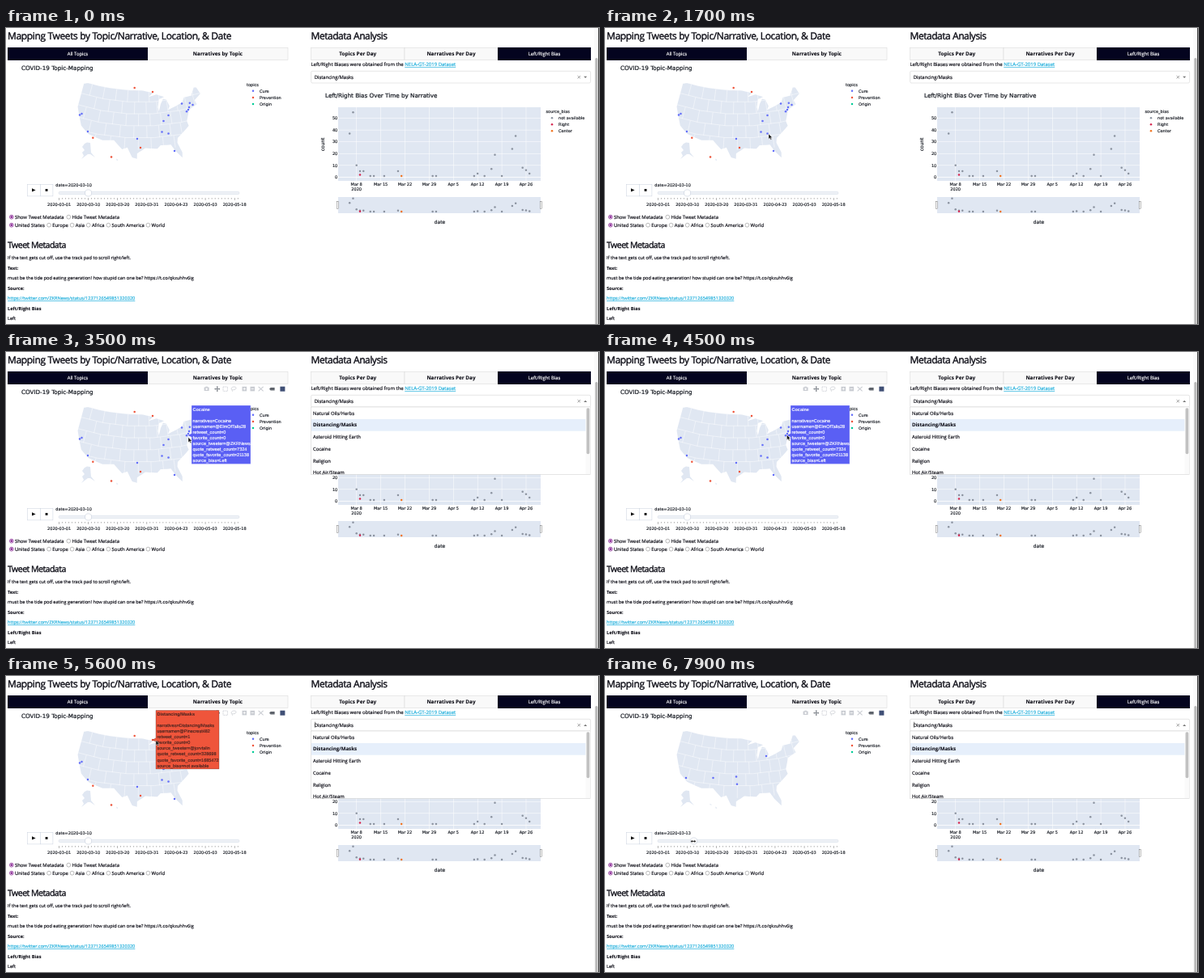
An HTML page that plays this animation: 732x366 px, repeating every 8 s.

```html
<!DOCTYPE html>
<html lang="en">
<head>
<meta charset="utf-8">
<title>Topic dashboard</title>
<style>
html, body { margin: 0; width: 100%; height: 100%; overflow: hidden; background: #fff; }
svg { display: block; width: 100vw; height: 100vh; }
text { font-family: "Open Sans", "Noto Sans", sans-serif; color: #0b0b14; fill: currentColor; stroke: currentColor;
  stroke-width: .03em; text-rendering: geometricPrecision; white-space: pre; }
.plot { font-family: "DejaVu Sans", Verdana, sans-serif; color: #161a22; }
.tip { font-family: "Liberation Sans", Arial, sans-serif; }
.b { font-weight: 700; stroke-width: .01em; }
.w { color: #fff; }
.link { color: #1eaedb; fill: currentColor; stroke: currentColor; text-decoration: underline; }
</style>
</head>
<body>
<svg id="stage" viewBox="0 0 732 366"></svg>
<script>
const BLUE = '#636efa', RED = '#ef553b', GREEN = '#00cc96', GREY = '#8b93a0';
const CRIMSON = '#d62750', ORANGE = '#f0731f', PANEL = '#e0e7f2', NAVY = '#04041f';

const text = (x, y, s, size = 5.9, cls = '', more = '') =>
  `<text x="${x}" y="${y}" font-size="${size}" class="${cls}" ${more}>${s}</text>`;
const mid = 'text-anchor="middle"', end = 'text-anchor="end"';
const plot = (x, y, s, more = '', size = 5) => text(x, y, s, size, 'plot', more);
const rect = (x, y, w, h, fill, more = '') =>
  `<rect x="${x}" y="${y}" width="${w}" height="${h}" fill="${fill}" ${more}/>`;
const dot = (x, y, fill, r = 1.25, more = '') => `<circle cx="${x}" cy="${y}" r="${r}" fill="${fill}" ${more}/>`;
const path = (d, more) => `<path d="${d}" ${more}/>`;
const box = (c, w = 0.5) => `stroke="${c}" stroke-width="${w}"`;
const stroke = (c, w) => 'fill="none" ' + box(c, w);
const group = (id, body) => `<g id="${id}">${body}</g>`;

// --- Map: Albers equal-area projection ---
function project(lon, lat) {
  const rad = Math.PI / 180, n = 0.6028, a = n * (lon + 96) * rad;
  const r = Math.sqrt(1.3512 - 2 * n * Math.sin(lat * rad)) / n;
  return [164 + 210 * (r * Math.sin(a) + 0.0081), 115 + 210 * (r * Math.cos(a) - 1.2822)];
}
function trace(points) {
  const out = [];
  points.forEach(([lon, lat], i) => {
    const [toLon, toLat] = points[i + 1] || [lon, lat];
    for (let k = 0; k < 1; k += 0.2)
      out.push(project(lon + (toLon - lon) * k, lat + (toLat - lat) * k).map(v => v.toFixed(2)).join(' '));
  });
  return 'M' + out.join('L');
}
const coast = trace(`-124.7 48.4,-122.8 49,-95.2 49,-89.6 48,-92 46.7,-88 47.4,-84.4 46.3,-87 45.7,-87.8 43,-87.5 41.7,
-86.4 44,-85 45.7,-83.4 45.2,-82.4 43,-83.3 41.8,-79 42.8,-76.3 43.5,-75 45,-71.5 45,-69.2 47.4,-68 47.2,-67 44.8,
-70.5 43.2,-70 41.7,-74 40.6,-76 37,-75.6 35.4,-81 32,-81.4 30.5,-80.1 27,-80.4 25.2,-82.7 28,-84 30.1,-88 30.3,
-89.4 29.2,-94 29.6,-97.2 27.8,-97.2 26,-99 26.4,-101 29.7,-103 29,-106.5 31.8,-111 31.3,-117.1 32.5,-120.6 34.6,
-124.3 40.4`.split(',').map(p => p.trim().split(' ').map(Number))) + 'Z';

// State lines: parallels every 4 degrees, staggered meridians that crowd together eastward.
let borders = '';
for (let row = 0; row < 5; row++) {
  const top = 49 - row * 4;
  borders += trace([[-125, top], [-67, top]]);
  for (let lon = row % 2 ? -117 : -120.5, step = 6.5; lon < -68; lon += step, step *= 0.94)
    borders += trace([[lon, top], [lon, top - 4]]);
}
const alaska = 'M94 147L97 143L100 141.5L104 142L105 154L110 160L104 156L101 156L93 162L96 158L94 154L97 151Z';
const islands = 'M129 158l2 .5l1 1l-2 0ZM136 161.5l2.5 1.4l-1.6 1.4Z';

const dots = (list, fill) => list.map(([x, y]) => dot(x, y, fill)).join('');
const early = dots([[91, 107.5], [93.5, 106], [101, 128], [162, 137], [192.5, 128.5], [200.5, 130.5], [194.5, 115],
  [200.5, 108], [208, 152], [217, 93.5], [226.8, 92.7], [230.5, 95], [226, 98], [225, 101], [223, 103.3]], BLUE) +
  dots([[158.7, 74], [181, 79], [107.3, 135.8], [166, 148], [130, 159.5]], RED);
const late = dots([[100, 126], [133.5, 126], [162, 124.5], [163, 133.8], [199, 99]], BLUE);

// --- Left column ---
const tab = (x, w, label, on) => (on ? rect(x, 24, w, 16, NAVY) : rect(x, 24.5, w, 15, '#f9f9f9', box('#d6d6d6'))) +
  text(x + w / 2, 34, label, on ? 5.9 : 6.4, on ? 'w' : 'b', mid);
const radio = (x, y, label, on) => dot(x, y, '#fff', 2.4, box(on ? '#8a2a96' : '#777', on ? 0.8 : 0.5)) +
  (on ? dot(x, y, '#8a2a96', 1.4) : '') + text(x + 4.2, y + 2.3, label);
const key = (x, y, label, fill) => dot(x, y, fill) + plot(x + 8, y + 1.8, label);

let left = text(2, 14, 'Mapping Tweets by Topic/Narrative, Location, &amp; Date', 12, '', 'letter-spacing="-.36"') +
  tab(175, 173, 'Narratives by Topic') + tab(2, 173, 'All Topics', true) +
  plot(19, 52.3, 'COVID-19 Topic-Mapping', '', 7.2) +
  plot(297, 72, 'topics') + key(305, 77.7, 'Cure', BLUE) + key(305, 85.9, 'Prevention', RED) + key(305, 94, 'Origin', GREEN) +
  path(coast + alaska + islands, `fill="${PANEL}"`) + path(borders, stroke('#fff', 0.45) + ' clip-path="url(#land)"') +
  group('early', early) + group('late', late) +
  rect(26.7, 193.3, 15.6, 14.6, '#fff', box('#c9d1de')) + rect(42.3, 193.3, 15.6, 14.6, '#fff', box('#c9d1de')) +
  path('M32 198.2L36.6 200.4L32 202.6Z', 'fill="#111"') + rect(48.6, 199, 2.9, 2.9, '#111') +
  '<text id="date" x="61.3" y="196" font-size="5" class="plot"></text>' +
  rect(65, 202.3, 223, 3.4, '#eef1f6', 'rx="1.7" ' + box('#ccd4e0', 0.4)) +
  '<circle id="knob" cy="204" r="4.1" fill="#fff" stroke="#b9c3d3" stroke-width=".5"/>';
for (let i = 0; i < 56; i++) left += rect(65.4 + i * 4.01, 210, 0.4, i % 9 ? 1.6 : 2.9, '#444');
['03-01', '03-10', '03-20', '03-31', '04-23', '05-03', '05-18'].forEach((d, i) =>
  left += plot(65.6 + i * 36.1, 219.8, '2020-' + d, mid));
left += radio(6.8, 233.7, 'Show Tweet Metadata', true) + radio(77.3, 233.7, 'Hide Tweet Metadata');
[[6.8, 'United States'], [53, 'Europe'], [81.6, 'Asia'], [101.7, 'Africa'], [126.4, 'South America'], [175.4, 'World']]
  .forEach(([x, s], i) => left += radio(x, 243.7, s, !i));
left += text(2, 271.6, 'Tweet Metadata', 10.6, '', 'letter-spacing="-.55"');
[['If the text gets cut off, use the track pad to scroll right/left.'], ['Text:', 'b'],
  ['must be the tide pod eating generation! how stupid can one be? https://t.co/qkzuhhv6ig'], ['Source:', 'b'],
  ['https://twitter.com/ZKRNews/status/1237126549851320320', 'link'], ['Left/Right Bias', 'b'], ['Left']]
  .forEach(([s, cls], i) => left += text(2, 286 + i * 12.5, s, 5.65, cls));

// --- Chart: [days after Mar 8, count] ---
const bias = [[-2, 37], [-1, 55], [0, 10], [1, 5], [2, 5], [12, 5], [35, 3], [39, 7], [40, 19], [45, 24], [46, 35],
  [48, 8], [49, 6], [50, 3], ...[4, 5, 8, 22, 23, 34, 37, 42].map(day => [day, 1])];
const dayX = d => 432.7 + d * 4.27;
const points = (base, unit) => [...bias, [1, 2, CRIMSON], [13, 1, ORANGE]]
  .map(([d, n, fill = GREY]) => dot(dayX(d), base - n * unit, fill)).join('');
const grip = x => rect(x, 214.5, 2, 9, '#fff', box('#555', 0.4));

let right = text(376.5, 14, 'Metadata Analysis', 12, '', 'letter-spacing="-.45"') +
  tab(376.5, 115.5, 'Topics Per Day') + tab(492, 115, 'Narratives Per Day') + tab(607, 115, 'Left/Right Bias', true) +
  text(376.5, 47.2, 'Left/Right Biases were obtained from the <tspan class="link">NELA-GT-2019 Dataset</tspan>', 6) +
  plot(394, 85.8, 'Left/Right Bias Over Time by Narrative', '', 7.2) +
  rect(410, 98, 250, 91, PANEL) + rect(410, 209, 250, 20, PANEL);
for (let i = 0; i < 6; i++) {
  const y = 184.4 - i * 14.57;
  right += rect(410, y - 0.25, 250, i ? 0.5 : 0.8, '#fff') + plot(409.3, y + 1.8, i * 10, end);
}
['Mar 8', 'Mar 15', 'Mar 22', 'Mar 29', 'Apr 5', 'Apr 12', 'Apr 19', 'Apr 26'].forEach((s, i) =>
  right += rect(dayX(i * 7) - 0.2, 98, 0.5, 91, '#fff') + plot(dayX(i * 7), 195, s, mid));
right += plot(432.7, 201.3, '2020', mid) + points(184.4, 1.457) + points(227.3, 0.3) + grip(408.6) + grip(659.5) +
  plot(535.5, 241.6, 'date', mid, 5.9) + plot(0, 0, 'count', mid + ' transform="translate(393 144) rotate(-90)"', 5.9) +
  plot(666.5, 104.6, 'source_bias') + key(674, 111.2, 'not available', GREY) + key(674, 119.2, 'Right', CRIMSON) +
  key(674, 127.2, 'Center', ORANGE) +
  rect(726, 0, 5, 366, '#fafafa') + rect(727.3, 37, 3.2, 340, '#b9b9b9', 'rx="1.6"') + rect(731, 0, 1, 366, '#444') +
  rect(376.6, 53.3, 345, 14.7, '#fff', 'rx="1.6" ' + box('#ccc')) + text(380.7, 62.8, 'Distancing/Masks') +
  path('M705.6 59l3.4 3.4m0 -3.4l-3.4 3.4', stroke('#777', 0.7)) +
  path('M713.2 59.8h4l-2 2.2Z', 'id="closed" fill="#777"');

// --- Open list, toolbar, hover labels, pointer ---
let menu = path('M713.2 62h4l-2 -2.2Z', 'fill="#777"') + rect(376.6, 68, 345, 83.3, '#fff', box('#ccc')) +
  rect(377, 83, 338.6, 14.7, '#e6effb') + rect(715.6, 68.3, 5.8, 82.7, '#fafafa') +
  rect(716.6, 69.3, 3.7, 57, '#c1c1c1', 'rx="1.8"');
['Natural Oils/Herbs', 'Distancing/Masks', 'Asteroid Hitting Earth', 'Cocaine', 'Religion', 'Hot Air/Steam'].forEach((s, i) =>
  menu += text(379, 77.7 + i * 14.7, s, i == 1 ? 6.1 : 5.9, i == 1 ? 'b' : '', 'clip-path="url(#list)"'));

const pale = '#c9ccd2', dark = '#6f747c';
const zoom = (x, sign) => rect(x, 42.8, 5.6, 5.6, pale) + path(`M${x + 1.2} 45.6h3.2${sign}`, stroke('#fff', 0.8));
const tools = rect(244.6, 43.6, 6, 4.4, pale, 'rx=".6"') + rect(246.4, 42.7, 2.4, 1.2, pale) + dot(247.6, 45.8, '#fff', 1.2) +
  path('M257.6 45.7h6.4m-3.2 -3.2v6.4', stroke(dark, 0.9)) +
  [0, 90, 180, 270].map(a => path('M-1 -2.1L0 -3.4L1 -2.1Z', `fill="${dark}" transform="translate(260.8 45.7) rotate(${a})"`)).join('') +
  rect(268, 43, 5.4, 5.4, 'none', box(pale, 0.8) + ' stroke-dasharray="1.1 .5"') +
  path('M279.5 48.8c0 -2 -2.2 -2.6 -1 -4.4c1.5 -2.2 6.5 -1.6 5.4 .8c-.8 1.6 -3 1.8 -4.6 1.4', stroke(pale, 0.8)) +
  zoom(291.5, 'm-1.6 -1.6v3.2') + zoom(301.5, '') +
  path('M311.6 42.8l6 5.6m0 -5.6l-6 5.6', stroke(pale, 1.1)) +
  path('M325 45.7l1.6 -1.8h5v3.6h-5Z', 'fill="#5f646c"') + rect(338.4, 42.7, 6, 6, '#3f4f75');

function tip(id, x, y, w, px, py, fill, ink, lines) {
  const h = 72.4, shape = `M${px} ${py}L${x} ${py - 2.3}V${y}h${w}v${h}h${-w}V${py + 2.3}Z`;
  return group(id, path(shape, `fill="${fill}" stroke="${ink}" stroke-width=".3"`) + lines.map((s, i) =>
    text(x + 1.5, y + 6.6 + i * 7.05, s, 5.5, i ? 'tip' : 'tip b', `style="color:${ink}"`)).join(''));
}
const facts = (topic, user, rt, fav, from, qrt, qfav, side) => [topic, '', 'narratives=' + topic, 'username=@' + user,
  'retweet_count=' + rt, 'favorite_count=' + fav, 'source_tweeter=@' + from, 'quote_retweet_count=' + qrt,
  'quote_favorite_count=' + qfav, 'source_bias=' + side];
const masks = 'Distancing/Masks', none = 'not available', ink = '#4a2420';
const tips =
  tip('tipA', 229, 66, 73, 224, 103, '#5a5ff4', '#fff', facts('Cocaine', 'ElmOfTalis28', 0, 0, 'ZKRNews', 7324, 21138, 'Left')) +
  tip('tipB', 185, 42.5, 78, 181, 79, RED, ink, facts(masks, 'Pinecrest482', 1, 0, 'jorvtalin', 328698, 1685472, none)) +
  tip('tipC', 169.3, 112, 78, 166, 148, RED, ink, facts(masks, 'VELTRAMIX07', 0, 2, 'jorvtalin', 328842, 1685896, none));

const pointer = path('M0 0V6.2L1.5 4.9L2.6 7.3L3.7 6.8L2.6 4.5H4.5Z', 'id="arrow" fill="#111" stroke="#fff" stroke-width=".4"') +
  path('M-3.3 .4L-1.3 -1.4V-.2H1.3V-1.4L3.3 .4L1.3 2.2V1H-1.3V2.2Z', 'id="drag" fill="#111" stroke="#fff" stroke-width=".3"');

document.getElementById('stage').innerHTML =
  `<clipPath id="list"><path d="M376 68H715V151H376Z"/></clipPath><clipPath id="land"><path d="${coast}"/></clipPath>` +
  left + right + group('menu', menu) + rect(381, 56.7, 0.5, 7.2, '#111', 'id="caret"') +
  group('tools', tools) + tips + group('pointer', pointer);

// --- Motion ---
const $ = id => document.getElementById(id);
const show = (id, on) => $(id).setAttribute('opacity', +on);
const ramp = (t, a, b) => Math.min(1, Math.max(0, (t - a) / (b - a)));
const between = (t, a, b) => t >= a && t < b;

// Pointer moves: [from ms, to ms, x, y]
const moves = [[400, 1200, 205, 124], [1200, 1700, 202, 131], [1700, 2100, 225, 105.5], [4100, 4200, 224.5, 102.5],
  [4500, 5250, 185, 79.5], [6400, 6580, 168, 147], [6580, 6700, 145.5, 163], [6700, 7150, 101.5, 204], [7500, 7850, 109, 204]];
function pointerAt(t) {
  let x = 483, y = 323;
  for (const [a, b, toX, toY] of moves) {
    const k = ramp(t, a, b), e = k * k * (3 - 2 * k);
    x += (toX - x) * e;
    y += (toY - y) * e;
  }
  return `translate(${x} ${y})`;
}

function draw(t) {
  const open = t >= 2300, moved = t >= 7700, sliding = t >= 7100;
  $('pointer').setAttribute('transform', pointerAt(t));
  show('pointer', t >= 400);
  show('arrow', !sliding);
  show('drag', sliding);
  show('menu', open);
  show('closed', !open);
  show('caret', open && (t + 400) % 1000 < 500);
  show('tools', ramp(t, 2750, 3100));
  show('tipA', between(t, 2850, 4700));
  show('tipB', between(t, 5200, 6500));
  show('tipC', between(t, 6500, 6800));
  show('early', !moved);
  show('late', moved);
  $('date').textContent = 'date=2020-03-' + (moved ? 13 : 10);
  $('knob').setAttribute('cx', 101.6 + 8 * ramp(t, 7500, 7850));
}

const start = performance.now();
function frame() {
  draw((performance.now() - start) % 8000);
  requestAnimationFrame(frame);
}
frame();
</script>
</body>
</html>
```
